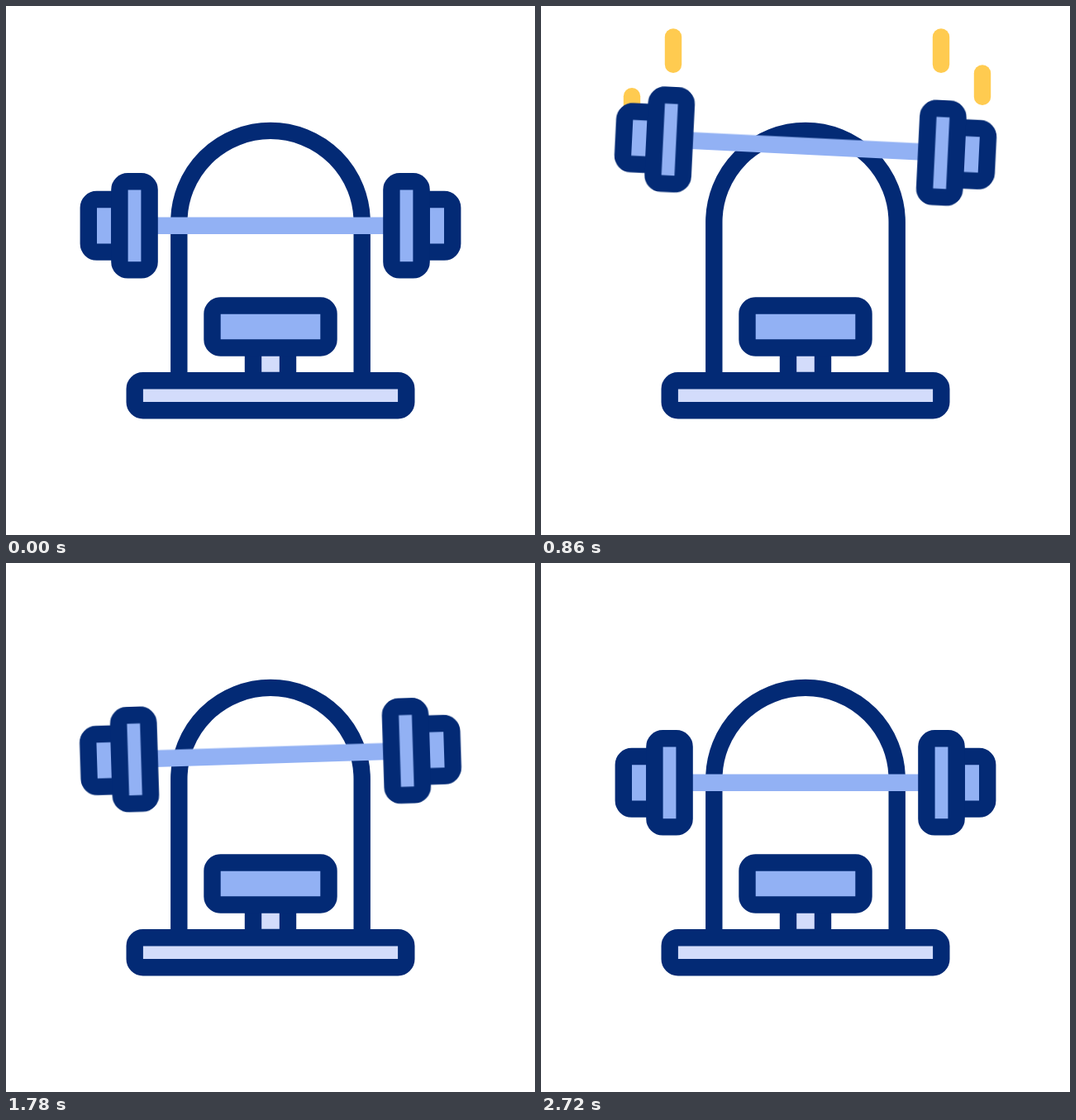
Recreate the animation shown at these times as an HTML page without scripts. Size 640x640 px, loop 3000 ms.

```html
<!DOCTYPE html>
<html lang="en">
<head>
<meta charset="utf-8">
<title>Bench press</title>
<style>
  :root {
    --navy: #032a75;
    --blue: #92b1f4;
    --pale: #d3dcfb;
    --yellow: #ffcb50;
    --smooth: cubic-bezier(.333, 0, .667, 1);
  }
  html, body { margin: 0; width: 100%; height: 100%; overflow: hidden; background: #fff; }
  svg { display: block; width: 100%; height: 100%; }

  .outline { fill: none; stroke: var(--navy); stroke-width: 20.4; }
  .blue { fill: var(--blue); }
  .pale { fill: var(--pale); }
  .bar { stroke: var(--blue); stroke-width: 20.4; }

  .lift, .tilt { transform-origin: 320px 265.8px; }
  .lift { animation: lift 3s var(--smooth) infinite; }
  .tilt { animation: tilt 3s var(--smooth) infinite; }

  .trails {
    fill: none;
    stroke: var(--yellow);
    stroke-width: 20.4;
    stroke-linecap: round;
    animation: show 3s step-end infinite;
  }
  .trails path { animation: trail 3s var(--smooth) infinite; }

  @keyframes lift {
    0%, 1.33% { transform: translateY(0); }
    22.67% { transform: translateY(-138px); }
    45% { transform: translateY(95px); }
    69.5% { transform: translateY(-109.4px); }
    90.67%, 100% { transform: translateY(0); }
  }
  @keyframes tilt {
    0%, 1.33% { transform: rotate(0deg); }
    10.67% { transform: rotate(-3.9deg); }
    30.67% { transform: rotate(3deg); }
    56% { transform: rotate(-2deg); }
    66% { transform: rotate(-1.25deg); }
    79.67% { transform: rotate(-5.8deg); }
    90.67%, 100% { transform: rotate(0deg); }
  }
  /* Each trail is drawn downwards, then erased from its top. */
  @keyframes trail {
    0%, 25.33% { stroke-dasharray: 0 200; stroke-dashoffset: 0; }
    36.17% { stroke-dasharray: 100 200; stroke-dashoffset: 0; }
    46.67%, 100% { stroke-dasharray: 0 200; stroke-dashoffset: -100; }
  }
  @keyframes show {
    0% { opacity: 0; }
    25.33% { opacity: 1; }
    46.67%, 100% { opacity: 0; }
  }
</style>
</head>
<body>
<svg viewBox="0 0 640 640">
  <defs>
    <g id="plates">
      <rect class="outline blue" x="99.8" y="234" width="37.5" height="63.6" rx="10"/>
      <rect class="outline blue" x="137.4" y="212.2" width="36.2" height="107.2" rx="10"/>
    </g>
  </defs>

  <path class="outline" d="M209.3 453V261.6a110.7 110.7 0 0 1 221.4 0V453"/>
  <path class="outline pale" d="M299 414V453H341V414"/>
  <rect class="outline blue" x="249.5" y="362.5" width="141" height="51" rx="10"/>
  <rect class="outline pale" x="155.7" y="453.2" width="328.6" height="36" rx="10"/>

  <g class="trails">
    <path pathLength="100" d="M110 109.3V207.3"/>
    <path pathLength="100" d="M160 37.5V182"/>
    <path pathLength="100" d="M484 37.5V182"/>
    <path pathLength="100" d="M534 81.5V205"/>
  </g>

  <g class="lift">
    <g class="tilt">
      <path class="bar" d="M174 265.8H466"/>
      <use href="#plates"/>
      <use href="#plates" transform="matrix(-1 0 0 1 640 0)"/>
    </g>
  </g>
</svg>
</body>
</html>
```
